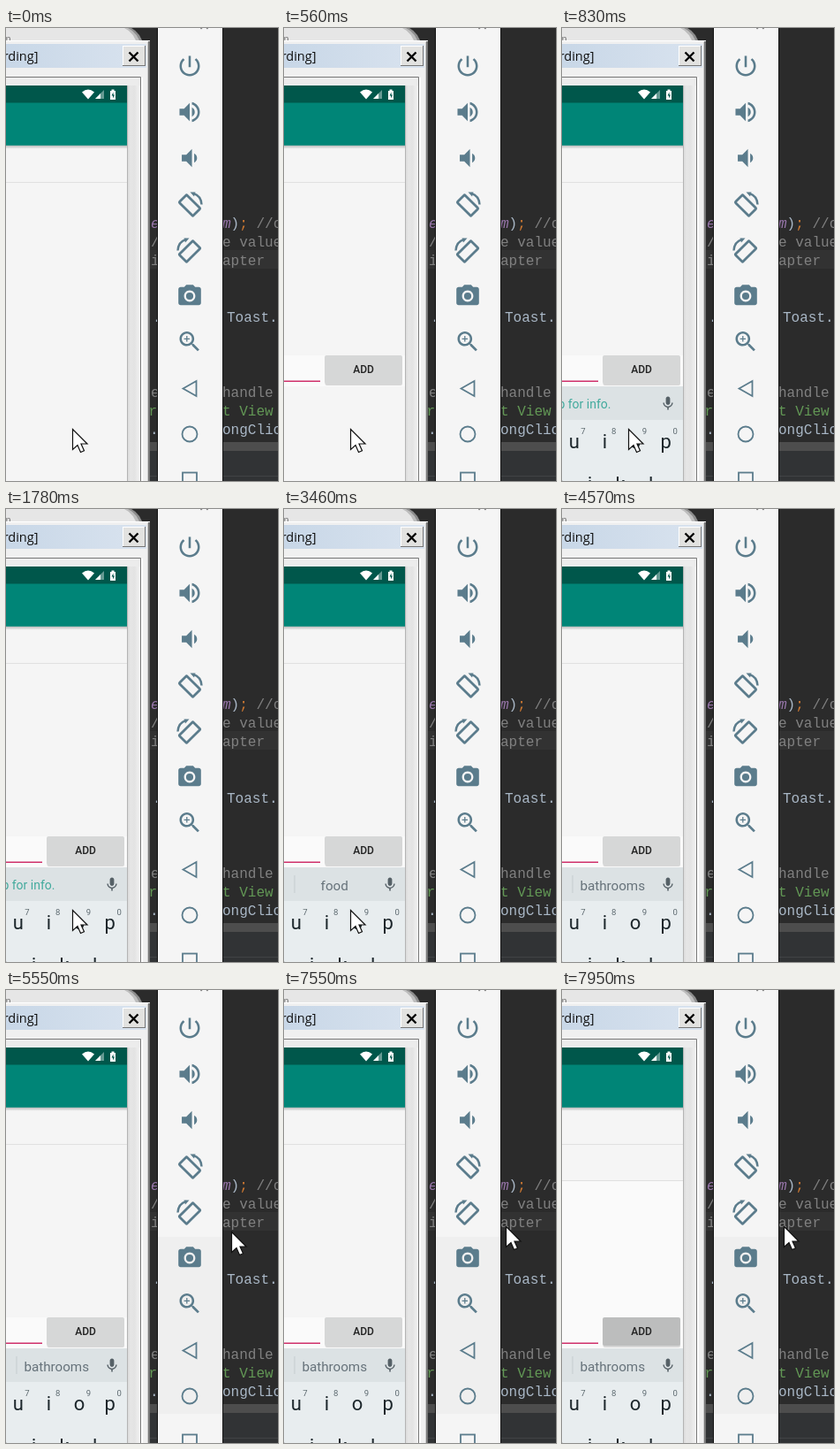
Write an HTML page that moves like this. It is 308x512 px and loops after 8 s.

```html
<!DOCTYPE html>
<html lang="en">
<head>
<meta charset="utf-8">
<title>Emulator screen</title>
<style>
html, body { margin: 0; width: 100%; height: 100%; overflow: hidden; background: #2b2b2b; }
svg { display: block; width: 100%; height: 100%; }
.code { font: 16px "Liberation Mono", monospace; white-space: pre; fill: #a9b7c6; }
.ui { font-family: Roboto, sans-serif; }
.note { fill: #808080; }
.doc { fill: #629755; font-style: italic; }
.field { fill: #9876aa; font-style: italic; }
.icon { fill: #5b7c8c; }
.line { fill: none; stroke: #5b7c8c; stroke-width: 1.800; }
</style>
</head>
<body>
<svg viewBox="0 0 308 512" preserveAspectRatio="none">
  <defs>
    <linearGradient id="bar"><stop stop-color="#c8d7e7"/><stop offset="1" stop-color="#d9e3ef"/></linearGradient>
    <linearGradient id="edge"><stop stop-color="#d6d6d6"/><stop offset=".25" stop-color="#e6e6e6"/><stop offset=".55" stop-color="#e3e3e3"/><stop offset="1" stop-color="#f2f2f2"/></linearGradient>
    <linearGradient id="shade" x2="0" y2="1"><stop stop-color="#000" stop-opacity=".24"/><stop offset="1" stop-color="#000" stop-opacity="0"/></linearGradient>
    <clipPath id="screen"><rect y="65" width="137" height="447"/></clipPath>
    <clipPath id="strip"><rect x="163" width="9" height="512"/></clipPath>
    <g id="rotate">
      <rect x="-11" y="-6" width="22" height="12" rx="1" transform="translate(-.5 1.500) rotate(45)" fill="none" stroke="#5b7c8c" stroke-width="2.800"/>
      <path d="M3.500 -12.200Q12.500 -9.500 13 .5" fill="none" stroke="#5b7c8c" stroke-width="2.400"/>
      <path d="M0 -13.500H6L4.500 -8.500Z"/>
    </g>
  </defs>

  <!-- code editor -->
  <rect width="308" height="512" fill="#2b2b2b"/>
  <rect x="163" y="251" width="145" height="21" fill="#323232"/>
  <rect x="163" y="468" width="145" height="10" fill="#4d4d4d"/>
  <rect x="163" y="478" width="145" height="34" fill="#313335"/>
  <path d="M163 506.500H308" stroke="#414345"/>
  <g class="code">
    <g clip-path="url(#strip)">
      <text class="field" x="164" y="226">e</text>
      <text class="note" x="164" y="247">/</text>
      <text class="note" x="164" y="268">i</text>
      <text x="166" y="332">.</text>
      <text class="note" x="164" y="417">e</text>
      <text class="doc" x="152" y="438" style="font-style:normal">er</text>
      <text x="163" y="459">.</text>
    </g>
    <text x="245" y="226"><tspan class="field">m</tspan>)<tspan fill="#cc7832">;</tspan> <tspan class="note">//o</tspan></text>
    <text class="note" x="245" y="247">e value</text>
    <text class="note" x="245" y="268">apter</text>
    <text x="250" y="332">Toast.</text>
    <text class="note" x="245" y="417">handle</text>
    <text class="doc" x="245" y="438" style="font-style:normal">t View</text>
    <text x="245" y="459">ongClic</text>
  </g>

  <!-- device frame behind the window -->
  <path d="M0 0H142Q152 5 156 20H0Z" fill="#8d8d8d"/>
  <path d="M0 0H138Q149 5 153 20H0Z" fill="#bdbdbd"/>
  <path d="M0 0H134Q145 5 149 20H0Z" fill="#e6e6e6"/>
  <text class="ui" x="-4" y="16" font-size="11" fill="#777">m</text>

  <!-- recorder window -->
  <rect y="14" width="163" height="498" fill="#f0f0f0"/>
  <path d="M0 14.500H162" stroke="#fff"/>
  <rect y="18" width="159" height="27" fill="url(#bar)"/>
  <path d="M162 15V512" stroke="#777" stroke-width="2"/>
  <path d="M160.500 16V512" stroke="#c9c9c9"/>
  <text x="36.500" y="36.500" text-anchor="end" font-family="Open Sans, sans-serif" font-size="14.500" font-weight="500" fill="#111">rding]</text>
  <rect x="132" y="20" width="26" height="23" fill="#777"/>
  <rect x="132" y="20" width="25" height="22" fill="#fff"/>
  <rect x="133" y="21" width="24" height="21" fill="#e2e2e0"/>
  <path d="M139.500 27.500L149.500 37.500M149.500 27.500L139.500 37.500" stroke="#000" stroke-width="2.400"/>
  <path d="M0 55.500H152.500V512" fill="none" stroke="#777"/>
  <path d="M154 56V512" stroke="#fff" stroke-width="2"/>
  <rect y="56" width="152" height="9" fill="#ececec"/>
  <rect x="137" y="65" width="15" height="447" fill="url(#edge)"/>
  <path d="M137.500 65V512" stroke="#b4b4b4"/>

  <!-- phone screen -->
  <g class="ui" clip-path="url(#screen)">
    <rect y="65" width="137" height="447" fill="#f5f5f5"/>
    <rect y="65" width="137" height="20" fill="#00574b"/>
    <rect y="84.500" width="137" height="48.300" fill="#008577"/>
    <rect y="132.800" width="137" height="4" fill="url(#shade)"/>
    <path d="M86 72.500Q93 66.500 100 72.500L93 80.500ZM101 80H107V74Z" fill="#fff"/>
    <path d="M101 80H111V70Z" fill="#fff" opacity=".4"/>
    <path d="M118 71H119.500V69.500H122.500V71H124V81H118Z" fill="#fff"/>
    <path d="M121.500 72.500L119.500 76.500H121V79.500L123 75.500H121.500Z" fill="#00574b"/>
    <path d="M0 174.500H137" stroke="#e0e0e0"/>
    <g id="newRow">
      <rect y="216" width="137" height="190" fill="#fafafa"/>
      <path d="M0 215.500H137" stroke="#e0e0e0"/>
    </g>
    <g id="entry">
      <rect y="370" width="137" height="35" fill="#fafafa"/>
      <path d="M0 399.300H41" stroke="#d0306b" stroke-width="1.500"/>
      <rect x="46.500" y="371" width="87.500" height="33" rx="2" fill="#000" opacity=".14"/>
      <rect id="button" x="46" y="370" width="88" height="32" rx="2"/>
      <text x="90" y="390" font-size="12" font-weight="500" text-anchor="middle" fill="#222">ADD</text>
    </g>
    <g id="keyboard">
      <rect y="405" width="137" height="120" fill="#e8edef"/>
      <rect y="405" width="137" height="38" fill="#dce2e4"/>
      <text id="hint" x="55.500" y="430" font-size="14" text-anchor="end" fill="#42aa9d">p for info.</text>
      <path id="split" d="M12 414V434" stroke="#c5cccf"/>
      <text id="word" x="57.200" y="430.500" font-size="15.200" text-anchor="middle" fill="#66727a"></text>
      <path transform="translate(110.400 414.800) scale(.8)" fill="#566167" d="M12 14c1.660 0 3-1.340 3-3V5c0-1.660-1.340-3-3-3S9 3.340 9 5v6c0 1.660 1.340 3 3 3zM17.300 11c0 3-2.540 5.100-5.300 5.100S6.700 14 6.700 11H5c0 3.410 2.720 6.230 6 6.720V21h2v-3.280c3.280-.480 6-3.300 6-6.720z"/>
      <g id="keys" text-anchor="middle"></g>
    </g>
  </g>

  <!-- emulator toolbar -->
  <rect x="171" width="75" height="512" fill="#151515"/>
  <rect x="172" width="73" height="512" fill="#f5f5f5"/>
  <rect id="hover" x="172" y="279" width="73" height="200" fill="#efefef"/>
  <path d="M220.500 -7L228.500 1M228.500 -7L220.500 1" stroke="#777" stroke-width="1.500"/>
  <g id="icons" class="icon">
    <use href="#rotate" x="208.500" y="199"/>
    <use href="#rotate" transform="translate(207.500 251) scale(-1 1)"/>
  </g>
  <g class="line">
    <path d="M200.500 407.500L215.500 399V416Z"/>
    <circle cx="208" cy="459" r="8.500"/>
    <rect x="200" y="502.500" width="16" height="17"/>
  </g>

  <path id="cursor" d="M.5 .5V23.500L6 18.500L9.500 26.500L13.500 24.800L10 17H17Z" fill="#fff" stroke="#111" stroke-width="1.200"/>
</svg>
<script>
const LOOP = 8000;
const $ = id => document.getElementById(id);
const svgNode = (tag, attrs, parent) => {
  const node = document.createElementNS("http://www.w3.org/2000/svg", tag);
  for (const name in attrs) node.setAttribute(name, attrs[name]);
  return parent.appendChild(node);
};

const icons = [
  [43, "M13 3h-2v10h2V3zm4.830 2.170l-1.420 1.420C17.990 7.860 19 9.810 19 12c0 3.870-3.130 7-7 7s-7-3.130-7-7c0-2.190 1.010-4.140 2.580-5.420L6.170 5.170C4.230 6.820 3 9.260 3 12c0 4.970 4.030 9 9 9s9-4.030 9-9c0-2.740-1.230-5.180-3.170-6.830z"],
  [95, "M3 9v6h4l5 5V4L7 9H3zm13.500 3c0-1.770-1.020-3.290-2.500-4.030v8.050c1.480-.730 2.500-2.250 2.500-4.020zM14 3.230v2.060c2.890.860 5 3.540 5 6.710s-2.110 5.850-5 6.710v2.060c4.010-.910 7-4.490 7-8.770s-2.990-7.860-7-8.770z"],
  [147, "M18.500 12c0-1.770-1.020-3.290-2.500-4.030v8.050c1.480-.730 2.500-2.250 2.500-4.020zM5 9v6h4l5 5V4L9 9H5z"],
  [303, "M9 2L7.170 4H4c-1.100 0-2 .9-2 2v12c0 1.100.9 2 2 2h16c1.100 0 2-.9 2-2V6c0-1.100-.9-2-2-2h-3.170L15 2H9zm3 15c-2.760 0-5-2.240-5-5s2.240-5 5-5 5 2.240 5 5-2.240 5-5 5zM8.800 12a3.200 3.200 0 1 0 6.400 0a3.200 3.200 0 1 0-6.400 0z"],
  [354.500, "M15.500 14h-.790l-.280-.270C15.410 12.590 16 11.110 16 9.500 16 5.910 13.090 3 9.500 3S3 5.910 3 9.500 5.910 16 9.500 16c1.610 0 3.090-.590 4.230-1.570l.270.280v.790l5 4.990L20.490 19l-4.990-5zm-6 0C7.010 14 5 11.990 5 9.500S7.010 5 9.500 5 14 7.010 14 9.500 11.990 14 9.500 14zm2.500-4h-2v2H9v-2H7V9h2V7h1v2h2v1z"]
];
for (const [y, d] of icons) {
  svgNode("path", {
    d, "fill-rule": "evenodd",
    transform: `translate(208 ${y}) scale(1.28) translate(-12 -12)`
  }, $("icons"));
}

const keys = [];
function addRow(letters, x, y) {
  [...letters].forEach((letter, i) => {
    const node = svgNode("text", { x: x + i * 34.6, y, "font-size": 22, fill: "#1c262b" }, $("keys"));
    keys.push({ node, letter });
  });
}
addRow("uiop", 13.8, 474.500);
addRow("hjkl", -3, 523);
[..."7890"].forEach((digit, i) => {
  svgNode("text", { x: 24 + i * 34.7, y: 459, "font-size": 9.500, fill: "#5c696f" }, $("keys")).textContent = digit;
});

const words = [[0, ""], [3460, "food"], [3740, "back"], [4140, "baby"], [4420, "bathroom"], [4570, "bathrooms"]];
const pointer = [[0, 75, 453], [4570, -50, -50], [4970, 268, 300], [5120, 264, 284], [5400, 261, 279], [5550, 255, 273], [7550, 251, 267]];
const at = (steps, t) => steps.filter(step => step[0] <= t).pop();
const show = (id, on) => $(id).setAttribute("visibility", on ? "inherit" : "hidden");

function draw(t) {
  show("entry", t >= 560);
  show("keyboard", t >= 710);
  $("keyboard").setAttribute("transform", `translate(0 ${t < 830 ? 40 : 0})`);
  const upper = t >= 1500 && t < 1780;
  for (const { node, letter } of keys) node.textContent = upper ? letter.toUpperCase() : letter;

  const word = at(words, t)[1];
  $("word").textContent = word;
  show("hint", !word);
  show("split", word);

  const added = t >= 7950;
  show("newRow", added);
  $("button").setAttribute("fill", added ? "#bcbdbd" : "#d6d7d7");
  show("hover", t >= 4970);

  const [, x, y] = at(pointer, t);
  $("cursor").setAttribute("transform", `translate(${x} ${y})`);
}

function tick() {
  draw(performance.now() % LOOP);
  requestAnimationFrame(tick);
}
tick();
</script>
</body>
</html>
```
